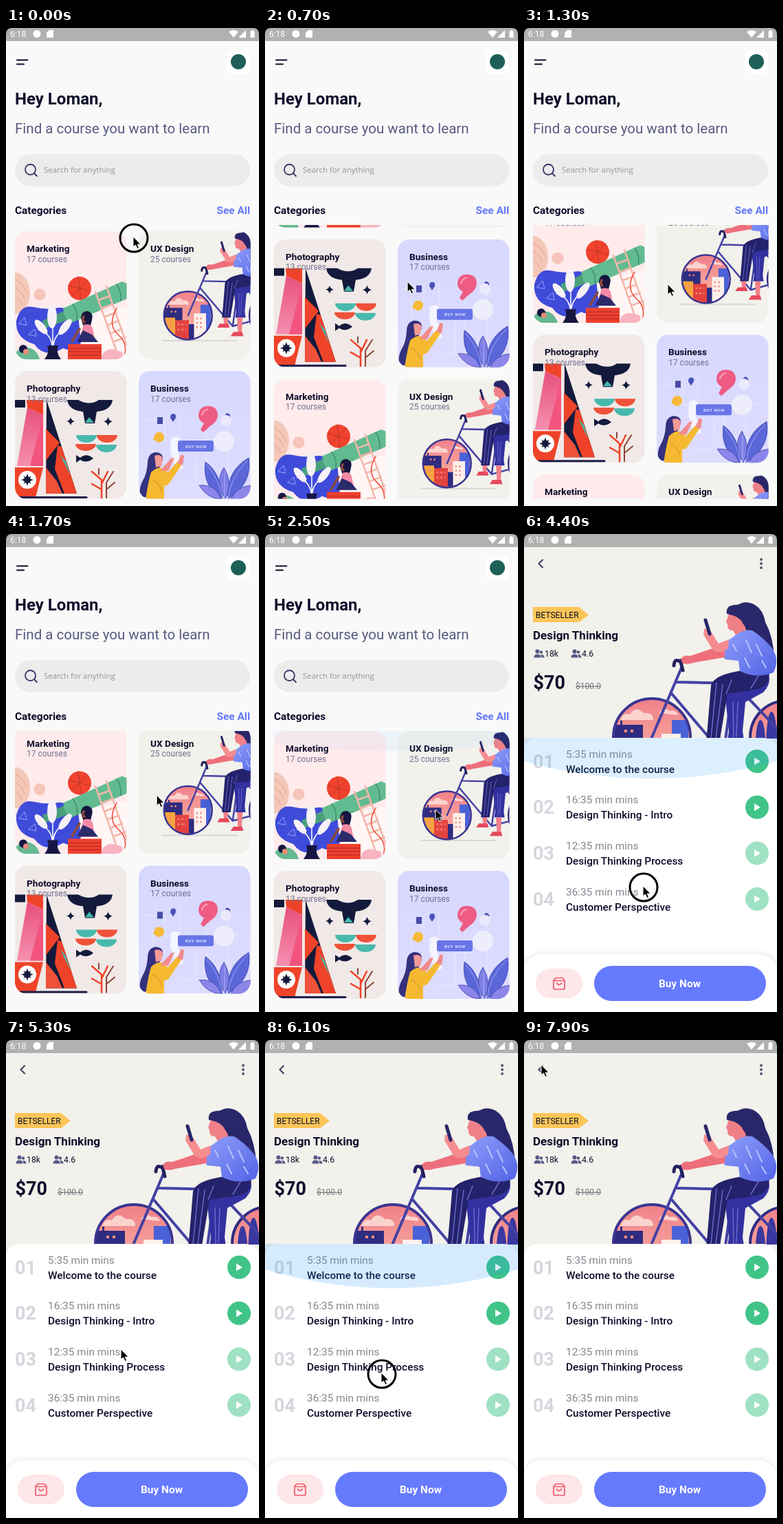
Animation, 368 px wide and 694 px high, one loop 8 s. Source, as an HTML page:

```html
<!DOCTYPE html>
<html lang="en">
<head>
<meta charset="utf-8">
<title>Course app</title>
<style>
html, body { margin: 0; width: 100%; height: 100%; overflow: hidden; background: #f9f9f9; }
svg { display: block; width: 368px; height: 694px; font-family: Roboto, Arial, sans-serif; fill: #0d0d2b; }
.b { font-weight: 700; }
.m { font-weight: 500; }
.n { fill: none; }
</style>
</head>
<body>
<svg viewBox="0 0 368 694">
<defs>
  <clipPath id="listClip"><rect x="0" y="286" width="368" height="397.5"/></clipPath>
  <clipPath id="homeGlowClip"><rect x="13" y="286" width="342" height="80"/></clipPath>
  <clipPath id="panelClip"><rect y="296" width="368" height="398"/></clipPath>
  <clipPath id="heroClip"><rect y="19" width="368" height="278"/></clipPath>
  <clipPath id="cardClip"><rect width="162.5" height="186" rx="17"/></clipPath>
  <clipPath id="wheelClip"><circle cx="186" cy="295" r="56"/></clipPath>
  <clipPath id="rearClip"><circle cx="382" cy="295" r="54"/></clipPath>
  <linearGradient id="lilac" x2="0" y2="1"><stop stop-color="#d7d8fe"/><stop offset="1" stop-color="#dedcff"/></linearGradient>
  <linearGradient id="shirt" x2="1" y2="1"><stop stop-color="#90a0fb"/><stop offset="1" stop-color="#5263e6"/></linearGradient>
  <linearGradient id="sky" x2="0" y2="1"><stop stop-color="#f08089"/><stop offset="1" stop-color="#f9b9a6"/></linearGradient>
  <linearGradient id="sail" x2="0" y2="1"><stop stop-color="#e8507c"/><stop offset="1" stop-color="#f58fb0"/></linearGradient>
  <filter id="soft" x="-10%" y="-30%" width="120%" height="160%"><feGaussianBlur stdDeviation="4"/></filter>

  <!-- cyclist, in the coordinates of the course page -->
  <g id="cyclist" stroke-linecap="round" stroke-linejoin="round">
    <g clip-path="url(#rearClip)">
      <circle cx="382" cy="295" r="54" fill="url(#sky)"/>
      <path d="M336 310q2-40 8-40t8 40zM352 310q1-52 8-52t9 52zM366 310q2-40 8-40t8 40z" fill="#3a37a0"/>
    </g>
    <circle cx="382" cy="295" r="53" class="n" stroke="#2e2c80" stroke-width="4"/>
    <g clip-path="url(#wheelClip)">
      <circle cx="186" cy="295" r="58" fill="url(#sky)"/>
      <path d="M140 270q4-12 14-8 8-14 20-2 14-2 14 10zM196 260q8-10 16-3 10-2 12 6z" fill="#fbd3cd"/>
      <path d="M120 277h20v-6h3v6h30v80h-53zM184 315h22v50h-22z" fill="#2e2c80"/>
      <path d="M215 270h24v80h-24z" fill="#4a62d8"/>
      <path d="M200 290h28v60h-28z" fill="#fdf0ec"/>
      <path d="M130 300h26v60h-26z" fill="#f6a43c"/>
      <path d="M156 306h32v54h-32z" fill="#e2423f"/>
      <path d="M146 286h16M205 302h18M205 312h18M205 322h18M162 316h20M162 328h20M135 312h14M135 324h14" class="n" stroke="#f38a7c" stroke-width="4" stroke-dasharray="4 5" stroke-linecap="butt"/>
    </g>
    <circle cx="186" cy="295" r="56" class="n" stroke="#3a3590" stroke-width="4"/>
    <path d="M186 295L230 192M222 215l85 2M215 232l75 88L306 205M290 320l90-25M306 217l74 78" class="n" stroke="#4441a4" stroke-width="4"/>
    <path d="M231 198l-3-12q-9-7-10 5" class="n" stroke="#23215f" stroke-width="5"/>
    <path d="M228 183h14" stroke="#23215f" stroke-width="4"/>
    <path d="M309 104Q322 95 336 103Q348 110 351 128Q362 148 364 178L338 188L300 132Q294 114 309 104Z" fill="#29276a"/>
    <path d="M298 116q11-9 18 2l8 24-14 8-6-10q-9 0-8-9l-2-4z" fill="#f08088"/>
    <path d="M295 116q-2-12 11-13 20-4 29 18l-4 24-12-14q-5-12-24-15z" fill="#29276a"/>
    <path d="M322 200h32q8 15-6 30l-26 14-4 42 2 14h-24l2-14-6-56q2-24 34-30z" fill="#3331a0"/>
    <path d="M318 198q18-4 38 0 4 24-20 28l-40 6-10 60-1 8h-20l2-20 5-60q4-16 46-22z" fill="#24226a"/>
    <path d="M280 216l-8 80M289 218l-10 78M302 212l-8 20M342 204l-12 20M304 244l1 52M311 244l-2 50" class="n" stroke="#6a67cc" stroke-width="1.5"/>
    <path d="M268 300h12l-2 16h-8zM300 300h13l-2 34h-9z" fill="#f08088"/>
    <path d="M260 314h20l3 9h-29zM292 333h20l3 10h-30z" fill="#e5485c"/>
    <path d="M302 151Q318 137 332 140Q348 150 361 166Q372 182 363 201Q338 211 314 199L312 184L292 182L286 162Z" fill="url(#shirt)"/>
    <path d="M323 154l8 18M338 160l8 17M321 180l7 14M346 184l6 10M304 160l5 10" stroke="#b6c1ff" stroke-width="2"/>
    <path d="M292 160l-50 17q-10-2-14 5l3 6q8 2 15-1l46-8z" fill="#ee6f7b"/>
    <path d="M298 153l-15 6-12-19-9-3-1 9 14 23q10 6 22-3z" fill="#f58d90"/>
    <path d="M264 125l6 20" stroke="#29276a" stroke-width="5"/>
  </g>

  <g id="art0" stroke-linecap="round">
    <rect width="163" height="186" fill="#ffeaec"/>
    <ellipse cx="0" cy="90" rx="22" ry="30" fill="#f3c8b8"/>
    <path d="M-4 68q16 6 22 22M-4 80q14 5 18 18M-4 93q10 3 14 14" class="n" stroke="#e79c8c"/>
    <path d="M70 150q20-34 60-32 20-10 33-6v62q-50 20-93-24z" fill="#fff6f5"/>
    <path d="M2 130Q8 106 26 110T58 112Q76 108 92 122L96 162Q88 178 70 170Q44 186 28 164Q0 156 2 130Z" fill="#3f4bd9"/>
    <path d="M6 134l8-9 3 11zM20 150l9-8 2 10zM72 122l8-6 4 9z" class="n" stroke="#98a4ff"/>
    <circle cx="36" cy="92" r="8.500" fill="#f6c4b8"/>
    <circle cx="94" cy="83" r="17" fill="#f1432d"/>
    <path d="M78 79l32 8M92 66l4 34M82 95l24-24" stroke="#b8352f"/>
    <path d="M40 130L75 114l4 14-35 13z" fill="#4a9f7c"/>
    <path d="M70 112L156 73L163 76V98L80 134Q72 126 70 112Z" fill="#62bb90"/>
    <path d="M84 106q8 9 6 23M148 77q7 10 6 24" class="n" stroke="#3c8f6c" stroke-width="1.500"/>
    <path d="M117 88l32 90M133 80l30 86M122 100l16-6M126 112l16-6M131 124l16-6M135 136l16-6M140 148l16-6M145 160l16-6" class="n" stroke="#f4b6a9" stroke-width="2.500"/>
    <path d="M148 112q-14 24 2 38t8 34" class="n" stroke="#ee4836" stroke-width="1.500"/>
    <path d="M96 127q0-11 10-11 9 3 6 13l-2 8-10 2z" fill="#161641"/>
    <path d="M100 136q10-3 13 5l4 20H92z" fill="#f48aa6"/>
    <path d="M90 161l9-17 13 6 9 11z" fill="#2b2b6c"/>
    <path d="M94 142l-11 18M100 124q-3 5 1 8" class="n" stroke="#8c4a3c" stroke-width="3.500"/>
    <path d="M77 164h49v22H77z" fill="#ef3f2d"/>
    <path d="M78 170h47M78 175h47M78 180h47" stroke="#a32a2a"/>
    <path d="M55 172V122M55 172Q56 148 75 142M55 172Q54 148 34 143" class="n" stroke="#fff" stroke-width="1.500"/>
    <g fill="#f5f1f6"><ellipse cx="54" cy="124" rx="7" ry="17"/><ellipse cx="73" cy="139" rx="5.500" ry="14" transform="rotate(38 73 139)"/><ellipse cx="38" cy="139" rx="5.500" ry="13" transform="rotate(-40 38 139)"/></g>
    <path d="M47 166h16q-4 10 4 20H43q8-10 4-20z" fill="#161641"/>
    <path d="M-2 186q3-17 18-17t20 17z" fill="#65b890"/><circle cx="12" cy="171" r="6" fill="#161641"/>
    <circle cx="16" cy="175" r="4" fill="#e78b78"/>
    <path d="M128 178q8-12 28-2v10h-30z" fill="#f8b3c0"/>
  </g>

  <g id="art1">
    <rect width="163" height="186" fill="#f2f1ec"/>
    <path d="M34 159h110" stroke="#d9d7d8" stroke-width="2"/>
    <use href="#cyclist" transform="translate(-44.500 -62) scale(.625)"/>
  </g>

  <path id="spark" d="M0-6Q1-1 6 0Q1 1 0 6Q-1 1-6 0Q-1-1 0-6Z" fill="#131a3c"/>
  <g id="art2" stroke-linecap="round">
    <rect width="163" height="186" fill="#f1e9e7"/>
    <path d="M0 42h15v11H0z" fill="#131a3c"/>
    <path d="M17 42h24v22L18 53z" fill="#ef4329"/>
    <path d="M18 53L41 64v74H3z" fill="url(#sail)"/>
    <path d="M41 64v74H22z" fill="#f2547e"/>
    <path d="M0 140h41v44H0z" fill="#ef4329"/>
    <path d="M41 140v44H30z" fill="#f1e9e7"/>
    <circle cx="18" cy="158" r="13" fill="#fff"/>
    <use href="#spark" transform="translate(18 158) scale(1.500)"/><use href="#spark" transform="translate(18 158) rotate(45) scale(1.300)"/>
    <path d="M46 42L90 178H45z" fill="#131a3c"/>
    <path d="M45 84l20 20-20 26zM62 108l6 2 22 68H72L58 142z" fill="#ef4329"/>
    <path d="M45 140l16 20 8 18H45z" fill="#ef5139"/>
    <path d="M66 122l8 9 6 20z" fill="#44b8a9"/>
    <path d="M76 42H92Q109 51 122 42H142Q140 57 119 59L116 76H102L99 59Q78 57 76 42Z" fill="#131a3c"/>
    <path d="M102 75l6-8 7 8z" fill="#44b8a9"/>
    <use href="#spark" x="81" y="73"/><use href="#spark" x="135" y="73" transform="translate(-13 -7) scale(1.100)"/>
    <path d="M89 93h30a15 11 0 0 1-30 0zM118 107h30a15 11 0 0 1-30 0z" fill="#48b9ad"/>
    <path d="M119 93h30a15 11 0 0 1-30 0zM88 106h30a15 10 0 0 1-30 0z" fill="#ef5139"/>
    <path d="M89 122l6 4q9-8 19 1-10 8-19 2l-6 4z" fill="#131a3c"/>
    <path d="M126 184v-26l-14-12M126 164l9-18M126 172l-14-8" class="n" stroke="#ef4329" stroke-width="2.500"/>
    <path d="M133 184v-22l10-16M133 172l12-10M122 150v-8" class="n" stroke="#8a4638" stroke-width="2"/>
    <path d="M7 183.500h97" stroke="#1d1d4c" stroke-width="3"/>
  </g>

  <g id="art3" stroke-linecap="round">
    <rect width="163" height="186" fill="url(#lilac)"/>
    <path d="M8 72h30v30h46M60 60v40h90M98 90v60h58M130 58v92M84 120v46H60M20 92v40" class="n" stroke="#e8e9ff"/>
    <path d="M27 67h8v10h-8z" fill="#4a4aa8"/>
    <path d="M50 62q5 0 4 6l-4 6-4-6q0-6 4-6zM129 61q5 1 4 7l-4 6-4-6q0-6 4-7z" fill="#4a52b8"/>
    <path d="M101 51q14 0 14 14-1 9-11 15l-10 9-4-4 5-9q-8-4-8-12 1-13 14-13z" fill="#ee5b83"/>
    <path d="M92 64q2-7 8-8" class="n" stroke="#f9a5ba" stroke-width="2"/>
    <path d="M25 90q9-3 12 4 1 8-8 10l-8-5z" fill="#f6ba38"/>
    <circle cx="127" cy="72" r="8" fill="#ebe9fc"/><circle cx="124" cy="102" r="15" fill="#eeedfb"/>
    <path d="M47 98q12-7 14 6l-4 14 8 24-10 3-9-28z" fill="#f4f4ff"/>
    <rect x="57" y="101" width="52" height="16" rx="3" fill="#6775e6"/>
    <text x="68" y="111.500" font-size="6" class="b" style="fill:#dfe3ff;letter-spacing:.6px">BUY NOW</text>
    <path d="M13 134q0-14 11-16 12 0 11 11l-8 20-7 34H2q-2-14 4-24t7-25z" fill="#34317e"/>
    <path d="M23 123q9-3 12 4l-2 11-8 2z" fill="#f39a94"/>
    <path d="M18 147q15-14 24 1l14-16 6 5-19 28-6 2v19H10q4-26 8-39z" fill="#f5b931"/>
    <path d="M56 134l6-13 4 2-2 14zM31 145l16-18 5-1-9 19z" fill="#f18b8c"/>
    <path d="M20 158q9 3 14 17" class="n" stroke="#d38b25"/>
    <g fill="#5b66d8" stroke="#3039a1" stroke-width=".7">
      <path d="M122 186Q92 168 97 132Q120 148 122 186ZM130 186Q126 146 160 126Q166 164 130 186Z"/>
      <path d="M126 186Q110 160 124 140Q138 164 126 186Z" fill="#7d7fe5"/>
      <path d="M120 186Q100 186 88 166Q112 164 120 186ZM134 186Q142 168 163 166V186Z" fill="#8d86ea"/>
      <path d="M99 136q20 24 23 50M158 130q-26 26-28 56M125 146v40" class="n" stroke="#bcc4ff"/>
    </g>
  </g>

  <g id="people" fill="#565985">
    <circle cx="5" cy="4" r="3"/><path d="M0 13q0-5 5-5t5 5z"/>
    <circle cx="10.500" cy="5" r="2.200"/><path d="M11 13q0-3-1.500-4.500 5.500-.5 5.500 4.500z"/>
  </g>
</defs>

<g id="home">
  <rect width="368" height="694" fill="#f9f9f9"/>
  <path d="M16 46.500h15.500M16 52.500h10" stroke="#0d0d2b" stroke-width="2" stroke-linecap="round"/>
  <rect x="321" y="33" width="34" height="33" rx="7" fill="#fff"/>
  <circle cx="338" cy="49" r="11" fill="#1e5f58"/>
  <text x="13" y="110.500" font-size="24" class="b">Hey Loman,</text>
  <text x="13" y="153" font-size="20.500" style="fill:#585a80">Find a course you want to learn</text>
  <rect x="13" y="183" width="342" height="47" rx="23.500" fill="#ececec"/>
  <g class="n" stroke="#353663" stroke-width="1.800" stroke-linecap="round"><circle cx="35.500" cy="205.500" r="7.500"/><path d="M41 211l4 4"/></g>
  <text x="55" y="210" font-size="11.450" style="font-family:'Open Sans',sans-serif;fill:#949494">Search for anything</text>
  <text x="13" y="270" font-size="15.400" class="b">Categories</text>
  <text x="355" y="270" font-size="15.400" class="b" text-anchor="end" style="fill:#6478fb">See All</text>
  <g clip-path="url(#listClip)"><g id="list"></g></g>
  <g clip-path="url(#homeGlowClip)"><g id="homeGlow"><circle cx="184" cy="-444.300" r="513" fill="#2196f3"/></g></g>
</g>

<g id="detail">
  <rect width="368" height="694" fill="#f2f1ec"/>
  <g clip-path="url(#heroClip)"><use href="#cyclist"/></g>
  <path d="M27 37.500l-5.500 5.500 5.500 5.500" class="n" stroke="#3b3c61" stroke-width="2" stroke-linecap="round" stroke-linejoin="round"/>
  <g fill="#56576f"><circle cx="345" cy="37" r="2"/><circle cx="345" cy="43" r="2"/><circle cx="345" cy="49" r="2"/></g>
  <path d="M13 106h67l14 11.500-14 10.500H13z" fill="#fdc558"/>
  <text x="17" y="121.500" font-size="12">BETSELLER</text>
  <text x="13" y="153" font-size="17.100" class="b">Design Thinking</text>
  <use href="#people" x="14.500" y="166.500"/><use href="#people" x="68.500" y="166.500"/>
  <text x="30" y="178" font-size="12.300">18k</text><text x="84" y="178" font-size="12.300">4.6</text>
  <text x="13.500" y="225" font-size="27" class="b">$70</text>
  <text x="75" y="225" font-size="12" style="fill:#77787f;text-decoration:line-through">$100.0</text>
  <path d="M0 694V318Q0 296 22 296H346Q368 296 368 318V694Z" fill="#fff"/>
  <g id="lessons"></g>
  <g clip-path="url(#panelClip)">
    <g id="detailGlow"><circle cx="184" cy="-478" r="552" fill="#2196f3"/></g>
    <rect y="610" width="368" height="110" rx="25" fill="#000" opacity=".13" filter="url(#soft)"/>
    <rect y="610" width="368" height="110" rx="25" fill="#fff"/>
  </g>
  <rect x="17" y="631" width="68" height="43" rx="21.500" fill="#fde7e8"/>
  <g class="n" stroke="#ee5b6c" stroke-width="1.700" stroke-linejoin="round" stroke-linecap="round"><path d="M43 648l3-3.500h10l3 3.500v11q0 2-2 2H45q-2 0-2-2zM43 648.500h16M47.500 652q3.500 5 7 0"/></g>
  <rect x="102" y="627" width="250" height="51" rx="25.500" fill="#667afe"/>
  <text x="226.500" y="658" font-size="15.400" class="b" text-anchor="middle" style="fill:#fff">Buy Now</text>
</g>

<rect width="368" height="19" fill="#b1b1b1"/>
<path d="M0 0H9Q0 0 0 9ZM368 0H359Q368 0 368 9Z" fill="#000"/>
<g fill="#fff">
  <text x="6" y="13" font-size="12" style="fill:#fff">6:18</text>
  <circle cx="45" cy="8.500" r="5.500"/>
  <path d="M63 3h6v11h-10V7z"/>
  <path d="M324 5.500q7-5 14 0l-7 8.500zM349 3v11h-11zM355.500 4.500h1.500V3h3v1.500h1.500V14h-6z"/>
</g>
<circle id="ring" r="20" class="n" stroke="#000" stroke-width="3"/>
<path id="cursor" d="M0 0V15L3.500 12L6 17.500L8.500 16.500L6.200 11.200H11Z" fill="#000" stroke="#fff" stroke-width="1" stroke-linejoin="round"/>
</svg>

<script>
const el = id => document.getElementById(id);
const LOOP = 8000, ROW = 203, MAX_SCROLL = 397;

const cards = [["Marketing", 17], ["UX Design", 25], ["Photography", 13], ["Business", 17]];
const lessons = [["5:35", "Welcome to the course"], ["16:35", "Design Thinking - Intro"],
  ["12:35", "Design Thinking Process"], ["36:35", "Customer Perspective"]];

el("list").innerHTML = [...cards, ...cards].map(([name, count], i) => `
  <g transform="translate(${i % 2 ? 193 : 13} ${286 + ROW * (i >> 1)})">
    <g clip-path="url(#cardClip)"><use href="#art${i % 4}"/></g>
    <text x="17" y="30" font-size="13.650" class="b">${name}</text>
    <text x="17" y="44.500" font-size="12" style="fill:#70718f">${count} courses</text>
  </g>`).join("");

el("lessons").innerHTML = lessons.map(([time, name], i) => `
  <g transform="translate(0 ${66.7 * i})">
    <text x="13" y="339.500" font-size="27" class="b" style="fill:#d6d7dd">0${i + 1}</text>
    <text x="61" y="324.500" font-size="15.400" style="fill:#85868f">${time} min mins</text>
    <text x="61" y="346.500" font-size="15.400" class="m">${name}</text>
    <circle cx="339" cy="330" r="17" fill="${i < 2 ? "#40c488" : "#9fe1c3"}"/>
    <path d="M335 324.500v11l9-5.500z" fill="#fff"/>
  </g>`).join("");

// Each key: time, then values
const cursorKeys = [[0, 185, 303], [150, 185, 304], [650, 207, 368], [1000, 209, 372], [1400, 209, 372], [2300, 248, 400],
  [3500, 248, 400], [3950, 178, 432], [4400, 173, 511], [4600, 173, 518], [4900, 173, 518], [5500, 165, 425],
  [6100, 169, 483], [6300, 169, 490], [7200, 168, 460], [7750, 25, 36]];
const presses = [[0, 700], [2600, 2750], [4000, 4600], [5600, 6300]];
// Glow: opacity, height scale
const homeGlowKeys = [[1900, 0, .2], [2100, .1, .6], [2500, .05, .42], [2750, 0, .3]];
const detailGlowKeys = [[4050, 0, .2], [4400, .155, .8], [4600, .17, .85], [5200, 0, .4],
  [5650, 0, .2], [6100, .19, .87], [6300, .19, .9], [6900, 0, .4]];

const clamp = x => Math.min(1, Math.max(0, x));
const smooth = x => x * x * (3 - 2 * x);

function sample(keys, t) {
  const i = keys.findIndex(k => k[0] > t);
  if (i < 1) return (i ? keys[keys.length - 1] : keys[0]).slice(1);
  const a = keys[i - 1], b = keys[i], p = smooth((t - a[0]) / (b[0] - a[0]));
  return a.slice(1).map((v, j) => v + (b[j + 1] - v) * p);
}

function glow(id, top, keys, t) {
  const [alpha, scale] = sample(keys, t);
  el(id).setAttribute("transform", `translate(0 ${top}) scale(1 ${scale})`);
  el(id).setAttribute("opacity", alpha);
}

function draw(now) {
  const t = now % LOOP;
  const scroll = MAX_SCROLL * (1 - clamp((t - 200) / 1900)) ** 2.545;
  el("list").setAttribute("transform", `translate(0 ${-scroll})`);
  glow("homeGlow", 286, homeGlowKeys, t);
  glow("detailGlow", 296, detailGlowKeys, t);

  const enter = clamp((t - 2780) / 300), rise = 1 - (1 - enter) ** 3;
  el("detail").setAttribute("opacity", enter);
  el("detail").setAttribute("transform", `translate(0 ${(1 - rise) * 173})`);

  const [x, y] = sample(cursorKeys, t);
  el("cursor").setAttribute("transform", `translate(${x} ${y})`);
  el("ring").setAttribute("transform", `translate(${x + 1} ${y + 2})`);
  el("ring").setAttribute("opacity", +presses.some(([a, b]) => t >= a && t < b));
  requestAnimationFrame(draw);
}
requestAnimationFrame(draw);
</script>
</body>
</html>
```
